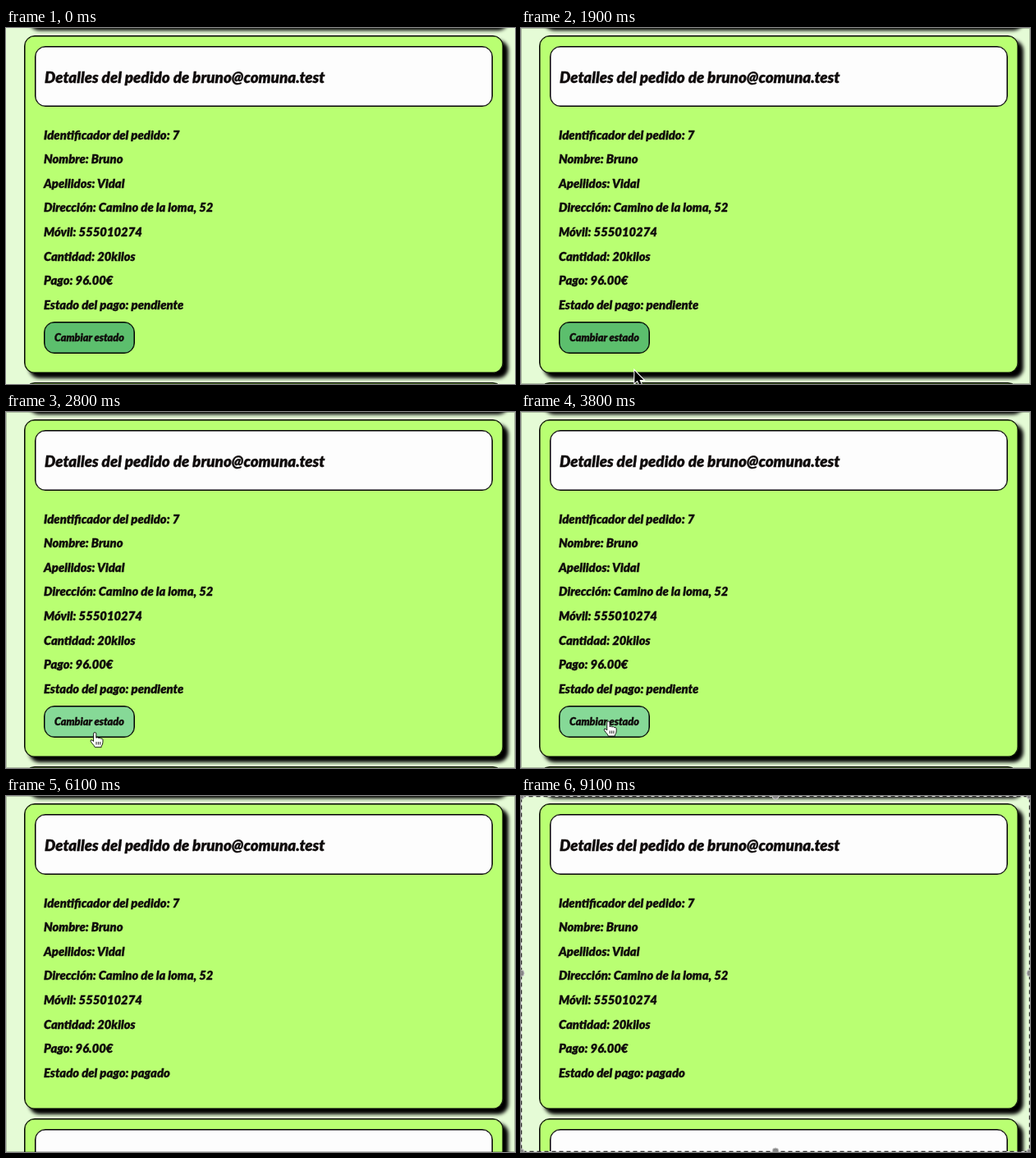
An HTML page that plays this animation: 620 px wide and 434 px high, repeating every 9.8 s.

```html
<!DOCTYPE html>
<html lang="es">
<head>
<meta charset="utf-8">
<style>
html, body { margin: 0; width: 100%; height: 100%; overflow: hidden; }
#stage {
  position: relative; width: 620px; height: 434px; overflow: hidden;
  background: #e5fbd6; color: #100c0c;
  font: italic 900 14.8px Lato, sans-serif; -webkit-text-stroke: .35px;
}
#stage * { position: absolute; box-sizing: border-box; white-space: nowrap; }
.card, .head, #button { border: 1px solid #000; border-radius: 13px; box-shadow: inset 0 0 0 .5px #000; }
.card { left: 22px; width: 584px; height: 412px; background: #b9ff72; box-shadow: 6px 6px 4px #000, inset 0 0 0 .5px #000; }
.head { left: 12px; top: 12px; width: 558px; height: 74px; background: #fdfdfd; font-size: 18.8px; line-height: 73px; padding-left: 11px; }
.row { left: 23px; line-height: 20px; }
#button { left: 23px; top: 348px; width: 111px; height: 39px; font-size: 12.7px; line-height: 37px; text-align: center; }
svg { left: 0; top: 0; width: 620px; height: 434px; }
</style>
</head>
<body>
<div id="stage">
  <div class="card" style="top:-415px"></div>
  <div class="card" id="order" style="top:9px">
    <div class="head">Detalles del pedido de bruno@comuna.test</div>
    <div id="button">Cambiar estado</div>
  </div>
  <div class="card" id="next"><div class="head"></div></div>
  <svg viewBox="0 0 620 434">
    <rect id="edge" x=".5" y=".5" width="619" height="433" fill="none" stroke="#000" stroke-opacity=".25"/>
    <g id="selection">
      <rect x=".5" y=".5" width="619" height="433" fill="none" stroke="#ddd"/>
      <rect x=".5" y=".5" width="619" height="433" fill="none" stroke="#333" stroke-width="1.4" stroke-dasharray="5 4"/>
    </g>
    <g id="cursor">
      <path id="arrow" d="M0 0V17.5L4 13.8L6.6 19.6L9.4 18.4L6.9 12.8H12.4Z" stroke="#fff" stroke-width="2.4" paint-order="stroke"/>
      <g id="hand" stroke="#000" stroke-linejoin="round">
        <path fill="#fff" d="M-2 1.5Q-2-.5 0-.5Q1.8-.5 1.8 1.5V7Q3.5 5.5 5 7.3Q7 6.2 8 8Q10.5 7.3 11 9.5V13Q11 16 9 18.5V20H0Q-1 17.5-4 14.5Q-7 11-5.5 10Q-4 9.2-2 12Z"/>
        <path d="M2 12.5v4M4.7 12.5v4M7.3 12.5v4"/>
      </g>
    </g>
  </svg>
</div>
<script>
const LOOP = 9800, PAID = 4800;
const $ = id => document.getElementById(id);
const show = (id, on) => { $(id).style.display = on ? '' : 'none'; };

const rows = [
  'Identificador del pedido: 7', 'Nombre: Bruno', 'Apellidos: Vidal',
  'Dirección: Camino de la loma, 52', 'Móvil: 555010274',
  'Cantidad: 20kilos', 'Pago: 96.00€', ''
].map((text, i) => {
  const row = document.createElement('div');
  row.className = 'row';
  row.textContent = text;
  row.style.top = 109.5 + i * 29.6 + 'px';
  $('order').append(row);
  return row;
});
const status = rows[rows.length - 1];

for (const [x, y] of [[310, 0], [0, 216], [620, 216], [310, 433], [0, 0], [620, 0], [0, 434], [620, 434]])
  $('selection').insertAdjacentHTML('beforeend',
    `<circle cx="${x}" cy="${y}" r="4" fill="#888" stroke="#ccc"/>`);

// Pointer path: time, x, y
const path = [
  [1700, 165, 431], [2000, 125, 411], [2400, 109.5, 396.5], [2600, 109, 396.5],
  [3300, 106.5, 377.5], [5600, 106.5, 377.5], [6100, 82, 445]
];

function pointerAt(t) {
  const i = path.findIndex(p => p[0] > t);
  if (i < 1) return null;
  const [t0, x0, y0] = path[i - 1], [t1, x1, y1] = path[i];
  const k = (t - t0) / (t1 - t0);
  return [x0 + (x1 - x0) * k, y0 + (y1 - y0) * k];
}

function draw(now) {
  const t = Math.floor(now % LOOP / 100) * 100;
  const paid = t >= PAID;
  status.textContent = 'Estado del pago: ' + (paid ? 'pagado' : 'pendiente');
  show('button', !paid);
  $('order').style.height = (paid ? 373 : 412) + 'px';
  $('next').style.top = (paid ? 393 : 432) + 'px';

  const pos = pointerAt(t);
  const hover = !!pos && !paid && pos[1] < 395;
  show('cursor', pos);
  if (pos) $('cursor').setAttribute('transform', `translate(${pos}) scale(.88)`);
  show('arrow', !hover);
  show('hand', hover);
  $('button').style.background = hover ? '#86d997' : '#5cbf6d';

  show('edge', t >= 1000);
  show('selection', t >= 8600);
  requestAnimationFrame(draw);
}
requestAnimationFrame(draw);
</script>
</body>
</html>
```
